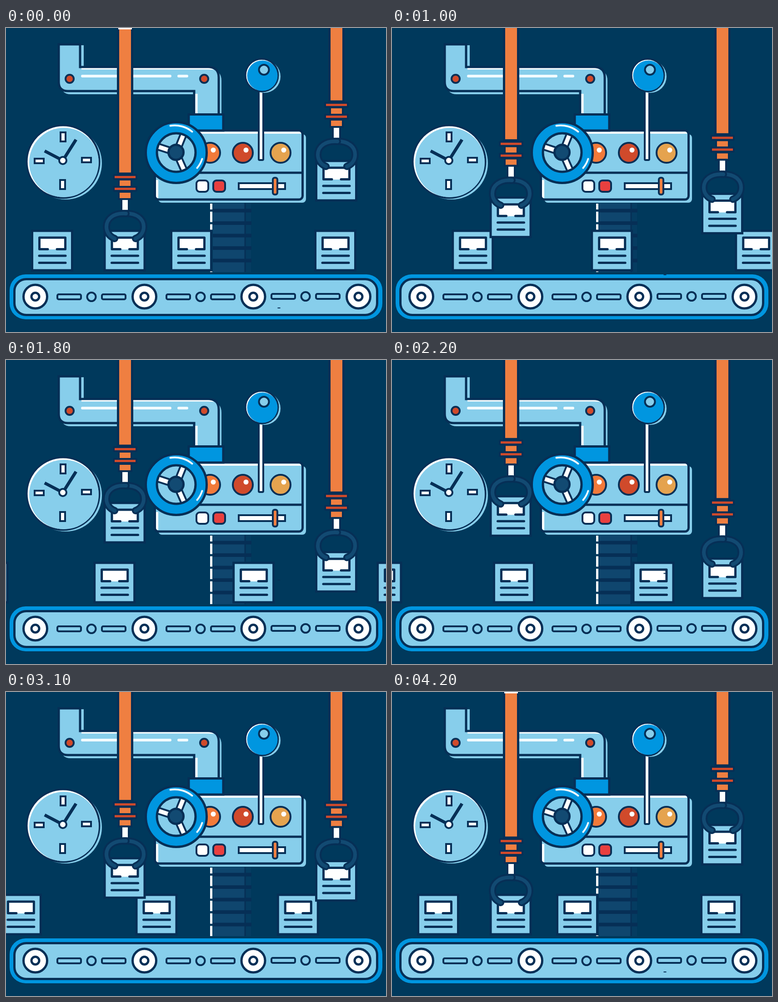
Write an HTML page that moves like this. It is 836 by 670 pixels and loops after 4.3 s.

```html
<!DOCTYPE html>
<html lang="en">
<head>
<meta charset="utf-8">
<title>Assembly line</title>
<style>
  html, body { margin: 0; width: 100%; height: 100%; overflow: hidden; background: #00395c; }
  svg { display: block; width: 836px; height: 670px; }
  .ink { stroke: #062f56; stroke-width: 5; }
  .thin { stroke-width: 4; }
  .line { fill: none; stroke-linecap: round; stroke-linejoin: round; }
  .sky { fill: #87ceeb; }
  .blue { fill: #0096e0; }
  .deep { fill: #124a72; }
  .white { fill: #fff; }
  .orange { fill: #ef7f41; }
  .red { fill: #d04a2b; }
  .shine { fill: none; stroke: #f2fbff; stroke-width: 5; stroke-linecap: round; }
</style>
</head>
<body>
<svg viewBox="0 0 836 670">
  <defs>
    <g id="box">
      <rect class="sky ink" x="57.500" y="447" width="88" height="87"/>
      <path class="white" d="M73 463h57v25H73z"/>
      <path class="ink line" d="M92 487.500H73.500V462H130.500V487.500H112M73 502H131M73 517.500H131"/>
    </g>
    <path id="claw" class="line" d="M264 409C236 407 221 421 221 438C221 451 229 460 239 464"/>
    <g id="clawHalf">
      <use href="#claw" class="ink" style="stroke-width:16"/>
      <use href="#claw" stroke="#124a72" stroke-width="8"/>
    </g>
    <g id="gripper">
      <rect class="orange ink" x="246.500" y="-340" width="31" height="661"/>
      <rect class="orange ink thin" x="248" y="334" width="28" height="16"/>
      <rect class="orange ink thin" x="248" y="361" width="28" height="16"/>
      <rect class="red ink thin" x="237" y="324" width="50" height="9" rx="2"/>
      <rect class="red ink thin" x="237" y="350" width="50" height="9" rx="2"/>
      <rect class="white ink thin" x="254" y="377" width="16" height="32"/>
      <use href="#clawHalf" transform="matrix(-1 0 0 1 524 0)"/>
      <use href="#clawHalf"/>
    </g>
    <g id="roller">
      <circle class="white ink" cy="592" r="26"/>
      <circle class="white ink" cy="592" r="8.500"/>
    </g>
    <g id="slots" class="sky ink thin">
      <rect x="-75" y="587" width="52" height="11" rx="3"/>
      <circle cy="592.500" r="9.500"/>
      <rect x="23" y="587" width="52" height="11" rx="3"/>
    </g>
    <path id="pipe" d="M116 36H163V86H445q23 0 23 23V191H414V139H136q-20 0-20-20z"/>
    <g id="lamp">
      <circle class="ink thin" r="22" cy="275"/>
      <circle class="white" cx="7" cy="269" r="5.500"/>
    </g>
    <rect id="spoke" class="white ink thin" x="-6.500" y="-42" width="13" height="30"/>
  </defs>

  <!-- clock -->
  <circle class="sky" cx="131" cy="298" r="80"/>
  <circle class="white ink thin" cx="125.500" cy="294.500" r="80"/>
  <circle class="sky" cx="127.500" cy="296.500" r="76.500"/>
  <g class="white ink thin">
    <path d="M120 230h11v20h-11zM119 335h11v20h-11zM63 288h20v10H63zM167 286h20v10h-20z"/>
    <path style="stroke-width:7" d="M125 292L154 246M125 292L85 271"/>
    <circle cx="125" cy="292" r="8"/>
  </g>

  <!-- pipe -->
  <use href="#pipe" class="sky" x="6" y="7"/>
  <path class="sky" d="M160 38h11v46h-11z"/>
  <use href="#pipe" class="sky ink"/>
  <path class="white" d="M166 88.500H445q8 0 13 4-6-1-13-1H166zM416.500 145h5v43h-5z"/>
  <path class="shine" style="stroke-width:6" d="M168 106H361M380 106H398"/>
  <g class="red ink thin"><circle cx="140" cy="112" r="9"/><circle cx="436" cy="112" r="9"/></g>

  <!-- column -->
  <path fill="#0f466e" d="M455 386h72v152h-72z"/>
  <path fill="#053c61" d="M527 386h12v152h-12z"/>
  <path stroke="#fff" stroke-width="5" stroke-dasharray="23 4.700" stroke-dashoffset="10" d="M451.500 387V538"/>
  <path class="ink" style="stroke-width:8" d="M455 402.500h85M455 430h85M455 457.500h85M455 485h85M455 512.500h85"/>
  <path class="ink" style="stroke-width:3" d="M526 386v152"/>

  <!-- machine -->
  <rect class="sky" x="335" y="234" width="325" height="151" rx="8"/>
  <rect class="sky ink" x="327.500" y="226" width="325" height="152" rx="8"/>
  <path class="white" d="M333 228.500H646q3 1 3 4.500H333zM330 335h5v40q-5 0-5-6z"/>
  <path class="blue ink" d="M402 190.500h76V226h-76z"/>
  <path class="ink" d="M400 319H652"/>
  <use href="#lamp" x="449" fill="#f27a3a"/>
  <use href="#lamp" x="521" fill="#d04a2b"/>
  <use href="#lamp" x="604" fill="#e5a34f"/>
  <g class="ink thin">
    <rect class="white" x="419" y="336" width="26" height="25" rx="7"/>
    <rect fill="#e8403f" x="456" y="336" width="26" height="25" rx="7"/>
    <rect class="white" x="512" y="342" width="102" height="13"/>
    <rect class="orange" x="587" y="330" width="10" height="37" rx="4"/>
    <rect fill="#f2fbff" x="556" y="130" width="10" height="161" rx="2"/>
  </g>

  <!-- lever knob -->
  <circle class="sky" cx="568" cy="107" r="36"/>
  <circle class="white ink thin" cx="562.500" cy="104" r="36"/>
  <circle class="blue" cx="564" cy="105" r="33.500"/>
  <circle class="sky ink thin" cx="567.500" cy="92" r="11"/>

  <!-- wheel -->
  <g transform="translate(374.500 274.500)">
    <circle class="blue ink" r="67"/>
    <circle class="sky ink" r="42.500"/>
    <use href="#spoke" transform="rotate(22)"/>
    <use href="#spoke" transform="rotate(156)"/>
    <use href="#spoke" transform="rotate(-72)"/>
    <circle class="deep ink" cx="-.5" cy="-.5" r="16.500"/>
    <path class="shine" style="stroke-width:4" d="M-13-59A60 60 0 0 1 35-46M57 14A59 59 0 0 1 46 34"/>
  </g>

  <!-- conveyor -->
  <rect class="blue" x="8" y="543" width="820" height="99" rx="35"/>
  <rect class="sky ink" x="18.500" y="553.500" width="798" height="79" rx="26"/>
  <use href="#roller" x="64.500"/><use href="#roller" x="304.500"/>
  <use href="#roller" x="544"/><use href="#roller" x="775.500"/>
  <use href="#slots" x="188"/><use href="#slots" x="428"/><use href="#slots" x="659" y="-1"/>

  <g id="cargo"><use href="#box"/><use href="#box"/><use href="#box"/><use href="#box"/></g>
  <g id="left">
    <use href="#box" x="159.500"/>
    <use href="#gripper"/>
    <path class="white" d="M247 0h30v3h-30z"/>
    <path fill="#062f56" d="M597.500 616h6v2h-6z"/>
  </g>
  <g id="right">
    <use href="#box" x="625" y="-154"/>
    <use href="#gripper" x="465" y="-159"/>
  </g>
</svg>
<script>
  const STEP = 100, LOOP = 4300, HALF = 21;
  const byId = id => document.getElementById(id);
  const cargo = [...byId('cargo').children];
  const left = byId('left'), right = byId('right');

  // Box offsets at the start, middle and end of the cycle.
  const stops = [[-205, -132, 0], [0, 160, 306], [306, 466, 623], [623, 783, 943]];
  const along = ([a, b, c], n) => n < HALF ? a + (b - a) * n / HALF : b + (c - b) * (n - HALF) / HALF;
  const lift = (group, y) => group.setAttribute('transform', `translate(0 ${y.toFixed(2)})`);

  function draw(now) {
    const n = Math.floor(now % LOOP / STEP);
    const swing = 1 - Math.abs(n - HALF) / HALF;
    lift(left, -154 * swing);
    lift(right, 152 * swing);
    cargo.forEach((box, i) => box.setAttribute('x', along(stops[i], n)));
    requestAnimationFrame(draw);
  }
  draw(performance.now());
</script>
</body>
</html>
```
